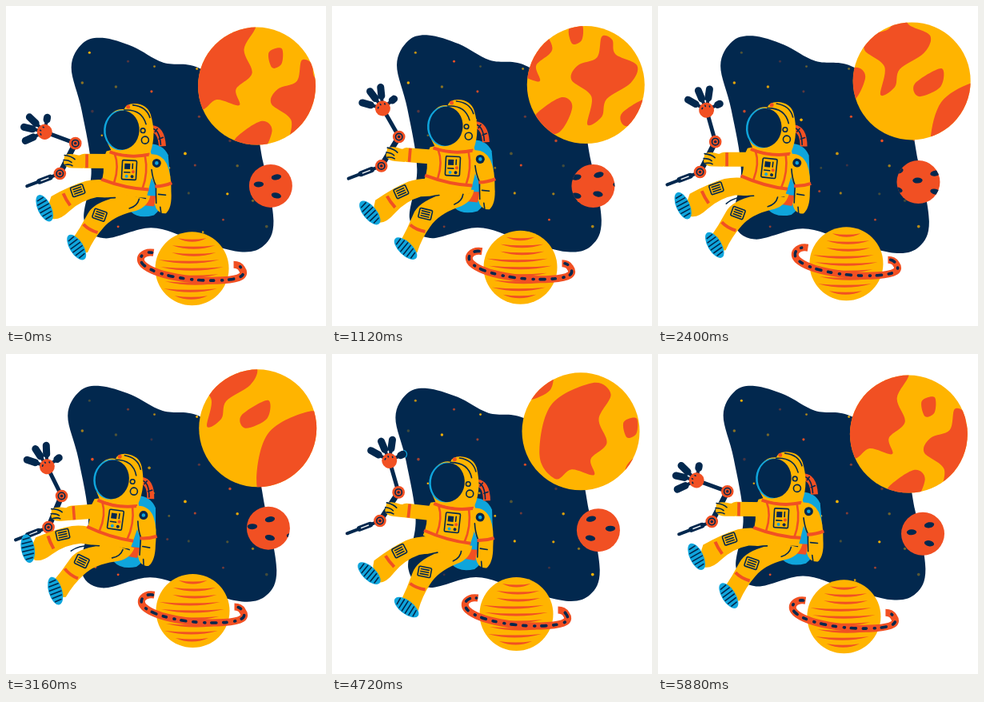
An HTML page that plays this animation: 400 px wide and 400 px high, repeating every 5.92 s.

```html
<!DOCTYPE html>
<html lang="en">
<head>
<meta charset="utf-8">
<title>Astronaut in space</title>
<style>
  html, body { margin: 0; width: 100%; height: 100%; overflow: hidden; background: #fff; }
  svg { display: block; width: 100vw; height: 100vh; }
  .n { fill: #02284e; }
  .y { fill: #ffb400; }
  .o { fill: #f15023; }
  .b { fill: #0fa5dc; }
  .ln { fill: none; stroke: #02284e; stroke-width: 1.6; stroke-linecap: round; stroke-linejoin: round; }
  .lo { fill: none; stroke: #f15023; stroke-width: 4; }
  .ly { fill: none; stroke: #ffb400; stroke-linecap: round; }
</style>
</head>
<body>
<svg viewBox="0 0 400 400">
  <defs>
    <clipPath id="skyClip"><path id="skyEdge"/></clipPath>
    <clipPath id="bigClip"><circle r="73.5"/></clipPath>
    <clipPath id="moonClip"><circle r="27"/></clipPath>
    <g id="sole">
      <ellipse class="b" rx="8.5" ry="18"/>
      <path class="ln" d="M-4-12L4-13M-6-7L6-8M-7-2L7-3M-7 3L7 2M-6 8L6 7M-4 13L4 12"/>
    </g>
    <g id="patch">
      <rect class="ln" x="-8" y="-6" width="16" height="12" rx="1.5"/>
      <path class="ln" d="M-5-3L5-3M-5 0L5 0M-5 3L5 3"/>
    </g>
    <g id="joint">
      <circle class="o" r="7.8"/>
      <circle class="ln" r="4.2"/>
      <circle class="n" r="1.7"/>
    </g>
    <g id="fingers"></g>
  </defs>

  <path id="sky" class="n"/>
  <g id="stars" clip-path="url(#skyClip)"></g>

  <g id="big">
    <circle class="y" r="73.5"/>
    <g clip-path="url(#bigClip)"><g id="land" class="o"></g></g>
  </g>

  <g id="moon">
    <circle class="o" r="27"/>
    <g clip-path="url(#moonClip)"><g id="craters" class="n"></g></g>
  </g>

  <g id="saturn">
    <circle class="y" r="46"/>
    <g id="stripes" class="o"></g>
    <path class="lo" style="stroke-width:9" d="M-48-20C-61-22-69-13-61-5C-46 9 3 17 39 14.500C62 13 68 8 62 0Q59-5 52-5"/>
    <path id="spots" class="ln" style="stroke-width:3.6" stroke-dasharray="4 10 1 8 6 9"
      d="M-50-20C-61-22-69-13-61-5C-46 9 3 17 39 14.500C62 13 68 8 62 0Q59-5 54-5"/>
  </g>

  <g id="pack">
    <path class="b" d="M178 172Q196 171 203 186L205 214Q200 249 184 261Q165 266 155 256L160 210Z"/>
    <path class="o" d="M168 236L189 237L184 250L167 248Z"/>
    <path class="lo" style="stroke-width:9" d="M183 153Q195 154 196 175"/>
    <path class="ln" d="M185 153Q193 156 194 173M190 153L187 157M197 164L192 166"/>
  </g>

  <g id="robot">
    <path id="tail" class="ln" style="stroke-width:4"/>
    <path id="blade" class="ln" style="stroke-width:7"/>
    <path id="slot" fill="none" stroke="#fff" stroke-width="1.3"/>
    <path id="rod" class="ln" style="stroke-width:7"/>
    <path id="fore" class="ln" style="stroke-width:5"/>
    <g clip-path="url(#skyClip)"><use class="claw" href="#fingers" stroke="#0fa5dc" stroke-width="2.4"/></g>
    <use class="claw" href="#fingers"/>
    <g class="claw">
      <circle class="o" r="9.5"/>
      <path class="ln" d="M3-5L4-4M5 0L6 0M3 5L4 5"/>
    </g>
    <use id="jointA" href="#joint"/>
    <use id="jointB" href="#joint"/>
    <path id="sleeve" class="ly" stroke-width="18"/>
    <path id="cuff" class="lo" style="stroke-width:17"/>
    <g id="glove">
      <path class="y" d="M-8-7Q0-10 9-7L16-7L15 9L3 9Q-7 9-9 3Z"/>
      <path class="ln" d="M-8-7Q1-6 5-2M-9-1Q-2-1 1 2M-7 5Q-1 4 2 6"/>
    </g>
  </g>

  <g id="legs">
    <g class="leg">
      <path class="y" d="M168 228Q125 212 99 219Q80 225 56 239Q50 253 58 267Q67 269 79 257Q94 243 113 239Q138 238 150 250Z"/>
      <path class="lo" d="M71 235Q74 242 80 250"/>
      <use href="#patch" transform="translate(89 231) rotate(-20)"/>
      <g transform="translate(48 254) rotate(-28)"><use class="foot" href="#sole"/></g>
    </g>
    <g class="leg">
      <path class="y" d="M146 230L180 236Q176 252 158 256Q133 263 122 277Q110 291 103 308Q92 311 83 293Q93 278 102 260Q109 246 136 239Z"/>
      <path class="lo" d="M97 273Q104 280 115 283"/>
      <use href="#patch" transform="translate(117 261) rotate(18)"/>
      <path class="ln" d="M154 252Q164 249 166 240M160 236L174 239M102 250Q112 240 136 239"/>
      <g transform="translate(89 302) rotate(-35)"><use class="foot" href="#sole"/></g>
    </g>
  </g>

  <g id="body">
    <path class="y" d="M126 180Q155 172 181 181Q187 198 181 217L175 239Q146 239 118 221Q124 206 121 192Z"/>
    <path class="lo" d="M119 215Q149 227 178 229"/>
    <path class="lo" style="stroke-width:2.6" d="M136 183Q142 199 135 219M174 186Q178 208 170 228"/>
    <path class="lo" d="M130 181Q154 190 180 185"/>
    <path class="y" d="M179 185Q194 183 201 197Q207 211 206 232Q207 252 199 259Q188 260 185 247L188 228L179 208Z"/>
    <path class="ln" d="M182 204Q183 215 187 224L187 246M190 235L199 236M193 259L192 251"/>
    <path class="lo" d="M186 225Q197 225 207 221"/>
    <circle class="n" cx="188.500" cy="196" r="5.500"/>
    <circle class="b" cx="188.500" cy="196" r="2.300"/>
    <g transform="translate(154 204) rotate(4)">
      <rect class="ln" x="-9" y="-12" width="18" height="24" rx="1.5"/>
      <rect class="n" x="-6" y="-8" width="7" height="7"/>
      <path class="ln" d="M4-8L4-2M-6 3L1 3"/>
      <circle class="o" cx="5" cy="2" r="2"/>
      <circle class="b" cx="-3" cy="8" r="2"/>
      <circle class="n" cx="4" cy="8" r="2"/>
    </g>
    <path class="y" d="M126 144Q134 126 149 128Q151 121 162 121Q178 122 182 135Q189 160 181 182Q154 188 132 179Q123 164 126 144Z"/>
    <path class="ln" d="M149 129Q171 128 176 147M160 123Q177 125 181 139"/>
    <circle class="o" cx="154" cy="125" r="2.500"/>
    <ellipse class="b" cx="144.500" cy="154" rx="21.500" ry="25" transform="rotate(5 144 154)"/>
    <ellipse class="n" cx="146.500" cy="154" rx="21" ry="24.500" transform="rotate(5 146 154)"/>
    <circle class="ln" cx="174.500" cy="167" r="4.500"/>
    <circle class="ln" cx="172" cy="155" r="2.800"/>
  </g>
</svg>
<script>
const LOOP = 5920, STEP = 40, TAU = Math.PI * 2, RAD = TAU / 360;
const $ = id => document.getElementById(id);
const all = name => document.querySelectorAll('.' + name);
const set = (id, name, value) => $(id).setAttribute(name, value);
const move = (id, x, y, extra = '') => set(id, 'transform', `translate(${x} ${y}) ${extra}`);
const turn = (name, value) => all(name).forEach(el => el.setAttribute('transform', value));
const add = (id, markup) => $(id).insertAdjacentHTML('beforeend', markup);

let seed = 11;
const random = () => (seed = seed * 16807 % 2147483647) / 2147483647;

// Closed smooth outline through a few x, y pairs
function outline(...v) {
  const n = v.length / 2;
  const p = i => { const k = (i + n) % n * 2; return [v[k], v[k + 1]]; };
  let d = 'M' + p(0);
  for (let i = 0; i < n; i++) {
    const [a, b, c, e] = [p(i - 1), p(i), p(i + 1), p(i + 2)];
    d += 'C' + [0, 1].map(k => b[k] + (c[k] - a[k]) / 6) + ' '
      + [0, 1].map(k => c[k] - (e[k] - b[k]) / 6) + ' ' + c;
  }
  return d + 'Z';
}

const skyPath = outline(120,39, 158,50, 196,70, 243,78, 303,130, 321,195, 334,268, 322,299,
  292,307, 234,292, 181,277, 122,290, 97,267, 106,205, 94,130, 81,76, 95,46);
set('sky', 'd', skyPath);
set('skyEdge', 'd', skyPath);

// One star per cell of a loose grid
for (let y = 57; y < 290; y += 34)
  for (let x = 95; x < 320; x += 42)
    add('stars', `<circle class="${random() < .7 ? 'y' : 'o'}" r="${1.2 + random() * .7}"
      cx="${x + random() * 30}" cy="${y + random() * 26}"/>`);

// The planet surface repeats along this vector once per loop
const drift = [190, 150];
const surface = [
  outline(-90,0, -76,-63, -24,-91, -1,-77, -16,-46, -6,-16, -26,4, -22,24, -50,17, -70,29),
  outline(56,-32, 69,-28, 73,-10, 100,4, 92,26, 62,46, 56,68, 38,78, 43,43, 18,22, 26,4, 50,-6),
  outline(-27,66, 5,44, 19,56, 2,88, -30,86),
  outline(81,64, 114,45, 113,68, 86,80),
  outline(15,-42, 31,-47, 31,-28, 19,-23)
].map(d => `<path d="${d}"/>`).join('');
add('land', `<g>${surface}</g><g transform="translate(${drift})">${surface}</g>`);

// The moon's craters repeat twice per loop
const craterWidth = 74;
for (let x = 0; x < craterWidth * 4; x += craterWidth)
  for (const [cx, cy] of [[7, -11], [7, 12], [35, -14], [34, 10], [59, -2]])
    add('craters', `<ellipse rx="6.2" ry="3.5" transform="translate(${x - craterWidth + cx} ${cy}) rotate(${cy})"/>`);

for (let y = -38; y < 40; y += 9) {
  const half = Math.sqrt(44 * 44 - y * y) * (.7 + .25 * random()), mid = (random() - .5) * 8;
  add('stripes', `<path d="M${mid - half} ${y}Q${mid} ${y + 9} ${mid + half} ${y}Q${mid} ${y + 3} ${mid - half} ${y}"/>`);
}

for (const angle of [-45, -7, 24, 80])
  add('fingers', `<g class="n" transform="rotate(${angle})">
    <path d="M6-2L15-2L15 2L6 2Z"/><rect x="11" y="-4.5" width="${angle > 60 ? 12 : 20}" height="9" rx="4.5"/></g>`);

const mix = (p, q, s) => [p[0] + (q[0] - p[0]) * s, p[1] + (q[1] - p[1]) * s];
const polar = (p, length, angle) => [p[0] + length * Math.cos(angle * RAD), p[1] + length * Math.sin(angle * RAD)];
const heading = (p, q) => Math.atan2(q[1] - p[1], q[0] - p[0]) / RAD;
const line = (id, p, q) => set(id, 'd', `M${p}L${q}`);

function draw(t) {
  const p = t / LOOP;
  // n swings per loop, delayed by a phase in degrees
  const wave = (phase, n = 1) => Math.cos(TAU * n * p - phase * RAD);

  const left = 79.5 + 2.3 * wave(20), right = 336.5 + 2.4 * wave(150);
  const top = 39.5 + 3.5 * wave(275), bottom = 308.3 + 1.2 * wave(215);
  const sx = (right - left) / 253, sy = (bottom - top) / 268;
  const fit = `matrix(${sx} 0 0 ${sy} ${left - 81 * sx} ${top - 39 * sy})`;
  set('sky', 'transform', fit);
  set('skyEdge', 'transform', fit);
  [...$('stars').children].forEach((s, i) =>
    s.setAttribute('opacity', .62 + .38 * wave(i * 137, 1 + i % 2)));

  move('big', 314.5 - 3.5 * wave(286), 96.5 + 3.7 * wave(12));
  move('land', -drift[0] * p, -drift[1] * p);
  move('moon', 329 + 4 * wave(298), 221.5 + 4.2 * wave(36));
  move('craters', -craterWidth * 2 * p, 0);
  move('saturn', 233.3 - 2.8 * wave(286), 324.7 + 3.6 * wave(12));
  set('spots', 'stroke-dashoffset', 114 * p);

  const dx = -7.3 + 8.7 * wave(0) - 1.4 * wave(0, 2);
  const dy = 1.5 + 5.7 * wave(265);
  const lean = 1.3 + 2.8 * wave(215);
  const swing = -1 - 3 * wave(0) + 5.5 * wave(20, 2);
  for (const id of ['pack', 'legs', 'body']) move(id, dx, dy, `rotate(${lean} 154 204)`);
  turn('leg', `rotate(${swing - lean} 155 235)`);
  turn('foot', `rotate(${swing * 1.5})`);

  // The robot arm is a chain of rigid parts
  const b = [66.8 + dx + .45 * swing, 207.5 + dy + .8 * swing];
  const a = polar(b, 42.5, -62 - .7 * swing);
  const aim = -126 - 22 * wave(0) - 2 * swing + 12 * wave(141, 3);
  const claw = polar(a, 41, aim), end = polar(b, 44, 159);
  line('tail', b, end);
  line('blade', mix(b, end, .3), mix(b, end, .62));
  line('slot', mix(b, end, .34), mix(b, end, .58));
  line('rod', a, b);
  line('fore', claw, a);
  move('jointA', ...a);
  move('jointB', ...b);
  turn('claw', `translate(${claw}) rotate(${aim})`);

  const shoulder = [133 + dx, 193 + dy], hand = mix(a, b, .5).map((v, i) => v + 4 - i);
  line('sleeve', shoulder, mix(hand, shoulder, .32));
  line('cuff', mix(hand, shoulder, .35), mix(hand, shoulder, .42));
  move('glove', ...hand, `rotate(${heading(hand, shoulder)})`);
}

const start = performance.now();
function tick(now) {
  const t = Math.max(0, now - start) % LOOP;
  draw(Math.floor(t / STEP) * STEP);
  requestAnimationFrame(tick);
}
draw(0);
requestAnimationFrame(tick);
</script>
</body>
</html>
```
